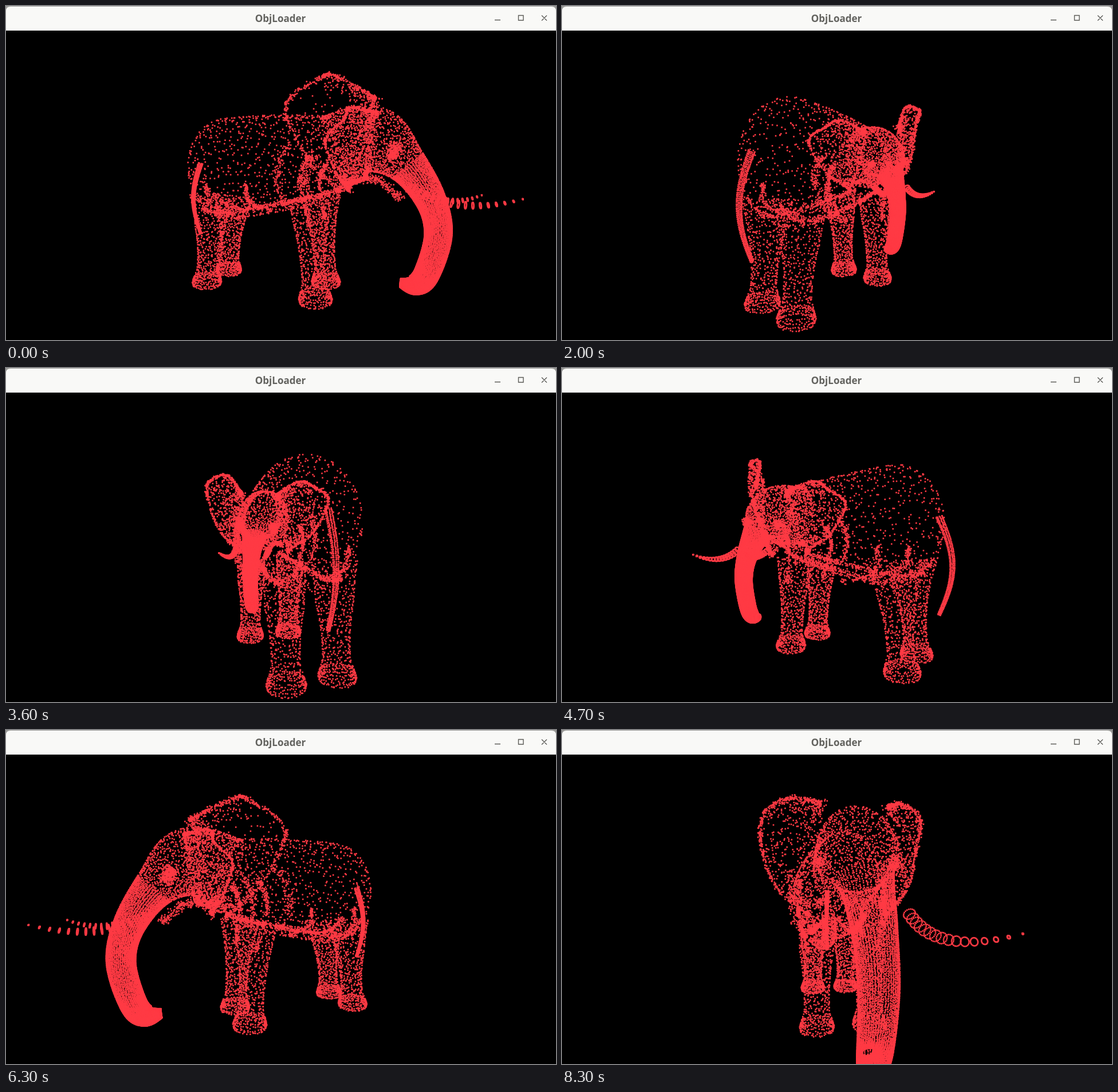
An HTML page with a canvas that plays this animation: 960 px wide and 584 px high, repeating every 8.4 s.

```html
<!DOCTYPE html>
<html lang="en">
<head>
<meta charset="utf-8">
<title>ObjLoader</title>
<style>
  html, body { margin: 0; width: 100%; height: 100%; overflow: hidden; background: #000; }
  canvas, svg { position: absolute; left: 0; top: 0; display: block; }
  text { font: 700 17px "Open Sans", "Noto Sans", sans-serif; fill: #62625e; }
</style>
</head>
<body>
<canvas id="stage" width="960" height="584"></canvas>
<svg width="960" height="584" fill="none" stroke="#5c5c58" stroke-width="1.4">
  <path d="M0 0H960V43H0Z" fill="#9a9a97" stroke="none"/>
  <path d="M0 43V9Q0 1 8 1H952Q960 1 960 9V43Z" fill="#f9f9f7" stroke="none"/>
  <text x="479" y="28" text-anchor="middle" stroke="none">ObjLoader</text>
  <path d="M853 24.5h10M894.5 16.5h8.5v8.5h-8.5zM935 16.5l9 9M944 16.5l-9 9"/>
</svg>
<script>
const ctx = document.getElementById('stage').getContext('2d');
const FOCAL = 468, DISTANCE = 1000, CENTER_X = 480, CENTER_Y = 314, GROUND = 380;
const STEP_MS = 100, STEPS = 84, DOT = 2.6;
const cloud = [];

let seed = 7;
function random() {
  seed = (seed + 0x6D2B79F5) | 0;
  let x = Math.imul(seed ^ (seed >>> 15), 1 | seed);
  x = (x + Math.imul(x ^ (x >>> 7), 61 | x)) ^ x;
  return ((x ^ (x >>> 14)) >>> 0) / 4294967296;
}
const lerp = (from, to, t) => from + (to - from) * t;
const scatter = (point, size) => point.map(v => v + (random() + random() - 1) * size);

// Catmull-Rom curve through points of any dimension, t in 0..1
function curve(points, t) {
  const last = points.length - 1;
  const i = Math.min(last - 1, Math.floor(t * last)), f = t * last - i;
  const p = k => points[Math.max(0, Math.min(last, i + k))];
  return p(0).map((v, k) => {
    const a = p(-1)[k], c = p(1)[k], d = p(2)[k];
    return v + 0.5 * f * (c - a + f * (2 * a - 5 * v + 4 * c - d + f * (3 * (v - c) + d - a)));
  });
}

// A shape maps t to [forward, left, down, halfHeight, halfWidth] of an elliptic section.
function surfacePoint(shape, t, phi) {
  const [a, b, c, u, w] = shape(t);
  const before = shape(Math.max(0, t - 0.01)), after = shape(Math.min(1, t + 0.01));
  const da = after[0] - before[0], dc = after[2] - before[2];
  const n = u * Math.cos(phi) / Math.hypot(da, dc);
  return [a + n * dc, b + w * Math.sin(phi), c - n * da];
}

function loft(shape, rings, perRing, jitter, from = 0, to = 1) {
  for (let i = 0; i < rings; i++) {
    for (let j = 0; j < perRing; j++) {
      const t = lerp(from, to, (i + 0.5 + jitter * (random() - 0.5)) / rings);
      const phi = (j + jitter * random()) / perRing * 2 * Math.PI;
      cloud.push(surfacePoint(shape, t, phi));
    }
  }
}

function line(points, count, spread) {
  for (let i = 0; i < count; i++) cloud.push(scatter(curve(points, random()), spread));
}

function body(t) {
  const rump = Math.sqrt(1 - (1 - Math.min(t * 3.5, 1)) ** 2);
  return [-374 + 574 * t, 0, -55 - 45 * t, rump * (205 - 65 * t * t), rump * (172 - 70 * t * t)];
}

function leg(hip, foot, side, thigh) {
  return t => {
    const flare = 15 * Math.max(0, 1 - Math.abs(t - 0.96) / 0.14);
    const radius = 39 + flare + (thigh - 39) * Math.max(0, 1 - t / 0.75) ** 2;
    return [lerp(hip, foot, t), side, lerp(40, GROUND, t), radius, Math.min(radius, 54)];
  };
}

const tail = t => [-362 - 38 * Math.sin(Math.PI * t), 0, -95 + 300 * t, 9 - 5 * t, 9 - 5 * t];

const tusk = splay => t => {
  const radius = 13 * (1 - t * t);
  return [430 + 246 * t, splay * (98 + 66 * t * t), 5 + 24 * t + 138 * t * (1 - t), radius, radius];
};

// Head and trunk share one spine: forward, down, radius
const spine = [[190, -115, 130], [320, -142, 116], [418, -72, 62], [490, 40, 42],
               [513, 150, 36], [482, 275, 33], [448, 316, 28], [408, 314, 13]];
const headAndTrunk = t => {
  const [a, c, radius] = curve(spine, t);
  return [a, 12 * t, c, radius, Math.min(radius * 1.06, 98)];
};
const TRUNK_START = 0.3;

loft(body, 30, 26, 1);
loft(tail, 62, 7, 0.3);
loft(headAndTrunk, 34, 38, 1, 0, TRUNK_START);
loft(headAndTrunk, 150, 44, 0.45, TRUNK_START, 1);

for (const side of [1, -1]) {
  const mirror = points => points.map(([a, b, c]) => [a, b * side, c]);
  const fold = (points, count, spread) => line(mirror(points), count, spread);

  for (const shape of [leg(130, 152, 84 * side, 75), leg(-250, -274, 77 * side, 95)]) {
    loft(shape, 27, 18, 1);
    loft(shape, 4, 42, 0.7, 0.9, 1);
  }
  loft(tusk(side > 0 ? 1 : -0.8), 16, 20, 0);

  const rim = mirror([[335, 85, -262], [231, 165, -312], [195, 238, -280],
                      [113, 260, -210], [160, 212, -75], [232, 110, 20]]);
  const root = [rim[0], [310, 105 * side, -130], rim[5]];
  line(rim, 330, 7);
  line(root, 110, 24);
  for (let i = 0; i < 540; i++) {
    const t = random(), s = random(), inner = curve(root, t);
    const point = curve(rim, t).map((v, k) => lerp(inner[k], v, s));
    point[0] += 90 * s * (1 - s) * Math.sin(Math.PI * t);
    cloud.push(scatter(point, 8));
  }

  const eye = [387, 88 * side, -106];
  for (let i = 0; i < 120; i++) cloud.push(scatter(eye, 24));

  // Jaw, shoulder and haunch folds
  fold([[245, 90, -15], [330, 78, -20], [405, 55, 36]], 120, 16);
  fold([[90, 160, -125], [50, 165, -40], [65, 150, 60]], 100, 20);
  fold([[146, 138, -93], [115, 140, -15], [140, 110, 132]], 160, 12);
  fold([[-225, 145, -5], [-210, 140, 70], [-90, 115, 112]], 110, 11);
  for (let i = 0; i < 240; i++)
    cloud.push(scatter(surfacePoint(body, 0.04 + 0.94 * random(), side * 0.82 * Math.PI), 12));
}

function draw() {
  const step = Math.floor(performance.now() / STEP_MS) % STEPS;
  const heading = (-21 + 3.6 * step) * Math.PI / 180;
  const cos = Math.cos(heading), sin = Math.sin(heading);
  ctx.fillStyle = '#000';
  ctx.fillRect(0, 0, 960, 584);
  ctx.fillStyle = '#ff3a44';
  for (const [a, b, c] of cloud) {
    const scale = FOCAL / (DISTANCE + a * sin + b * cos);
    const x = CENTER_X + (a * cos - b * sin) * scale;
    ctx.fillRect(x - DOT / 2, CENTER_Y + c * scale - DOT / 2, DOT, DOT);
  }
  requestAnimationFrame(draw);
}
draw();
</script>
</body>
</html>
```
